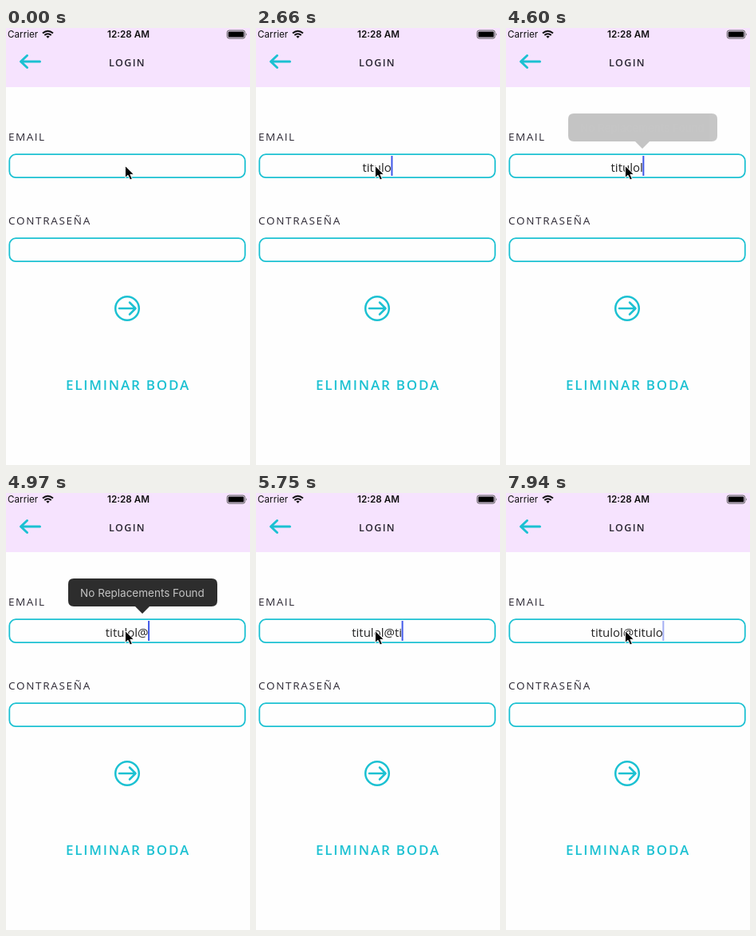
These frames come from a looping animation (306x547 px, 8 s). An HTML page:

```html
<!DOCTYPE html>
<html lang="es">
<head>
<meta charset="utf-8">
<title>Login</title>
<style>
html, body { margin: 0; width: 100%; height: 100%; overflow: hidden; background: #fefefe; }
svg { position: absolute; left: 0; top: 0; }
.hand { font-family: "Open Sans", "Noto Sans", sans-serif; }
.ui { font-family: Inter, sans-serif; }
.line { fill: none; stroke: #1cc1d2; stroke-width: 2.5; stroke-linecap: round; stroke-linejoin: round; }
.field { width: 295.5px; height: 29px; stroke-width: 1.8; }
</style>
</head>
<body>
<svg width="306" height="547" viewBox="0 0 306 547">
  <rect width="306" height="74" fill="#f6e3fe"/>

  <g class="ui" fill="#111" font-size="11.7">
    <text x="2" y="12">Carrier</text>
    <text x="153.5" y="12" text-anchor="middle" font-weight="600">12:28 AM</text>
  </g>
  <g fill="none" stroke="#111" stroke-width="2">
    <path d="M46 6.6Q52.5 1 59 6.6M48.3 9Q52.5 5.4 56.7 9"/>
    <path d="M52.5 12.8L50.3 10.5Q52.5 8.8 54.7 10.5Z" fill="#111" stroke="none"/>
  </g>
  <rect x="277.3" y="3" width="22.4" height="10" rx="2.5" fill="none" stroke="#555"/>
  <rect x="278.7" y="4.4" width="19.6" height="7.2" rx="1.2" fill="#000"/>
  <path d="M301 6.2q1.8 1.8 0 3.6z" fill="#555"/>

  <g class="line">
    <path d="M19.5 42H42.5M26.5 34.5L18.5 42L26.5 49.5" stroke-width="3"/>
    <rect class="field" x="4.3" y="158.2" rx="8"/>
    <rect class="field" x="4.3" y="263.2" rx="8"/>
    <circle cx="152" cy="351" r="14.8"/>
    <path d="M142 351H162M155 343.5L162.5 351L155 358.5"/>
  </g>

  <g class="hand" fill="#2b2733" font-size="13.5">
    <text x="129" y="47.5" font-size="12.5" font-weight="600" letter-spacing="1.4">LOGIN</text>
    <text x="3" y="141" letter-spacing="1.5">EMAIL</text>
    <text x="3" y="246" letter-spacing="1.7">CONTRASEÑA</text>
    <text x="75" y="452.5" font-size="17" font-weight="600" letter-spacing="1.8" fill="#1cc1d2">ELIMINAR BODA</text>
  </g>

  <text id="typed" class="hand" y="180" font-size="15" fill="#222"></text>
  <rect id="caret" y="160" width="2" height="25" fill="#4058e8"/>

  <g id="tip">
    <path d="M85 107H258Q265 107 265 114V135Q265 142 258 142H180L171 151L162 142H85Q78 142 78 135V114Q78 107 85 107Z" fill="#2d2d2d"/>
    <text id="tipText" class="ui" x="171" y="129.5" text-anchor="middle" font-size="13.5" fill="#c4c4c4">No Replacements Found</text>
  </g>

  <path d="M149.5 172.5V187.5L153 184.3L155.6 190L158.3 188.8L155.8 183.3H160.3Z" fill="#000" stroke="#fff" stroke-width=".9"/>
</svg>
<script>
const LOOP = 8000, CENTER = 151.7;
const WORD = 'titulol@titulo';
const SYMBOL_ON = 3120, SYMBOL_OFF = 4280; // a wrong symbol is typed, then deleted
const $ = id => document.getElementById(id);
const typed = $('typed'), caret = $('caret'), tip = $('tip'), tipText = $('tipText');

// Typing bursts: start, letters, gap, slowdown
const keys = [[1560, 7, 170, 10], [4970, 1], [5600, 5, 150], [6930, 1]]
  .flatMap(([start, n, gap = 0, slow = 0]) =>
    Array.from({ length: n }, (_, i) => start + gap * i + slow * i * i));

const ramp = (t, start, span) => Math.min(1, Math.max(0, (t - start) / span));

// Solid after a key press, then dim, then back
const blink = idle => 1 - .75 * (ramp(idle, 460, 240) - ramp(idle, 940, 240));

function draw(t) {
  const count = keys.filter(k => k <= t).length;
  typed.textContent = WORD.slice(0, count) + (t >= SYMBOL_ON && t < SYMBOL_OFF ? '™' : '');
  const width = typed.getComputedTextLength();
  typed.setAttribute('x', CENTER - width / 2);

  const lastPress = Math.max(...[630, ...keys, SYMBOL_ON, SYMBOL_OFF].filter(k => k <= t || k === 630));
  caret.setAttribute('x', CENTER + width / 2 - .5);
  caret.setAttribute('opacity', ramp(t, 470, 240) * blink(t - lastPress));

  const alpha = t < 4600 ? 0 : ramp(t, 4520, 300) * (1 - ramp(t, 5010, 110));
  tip.setAttribute('opacity', alpha);
  tipText.setAttribute('opacity', alpha ** 3);
}

function frame() {
  draw(performance.now() % LOOP);
  requestAnimationFrame(frame);
}
frame();
</script>
</body>
</html>
```
